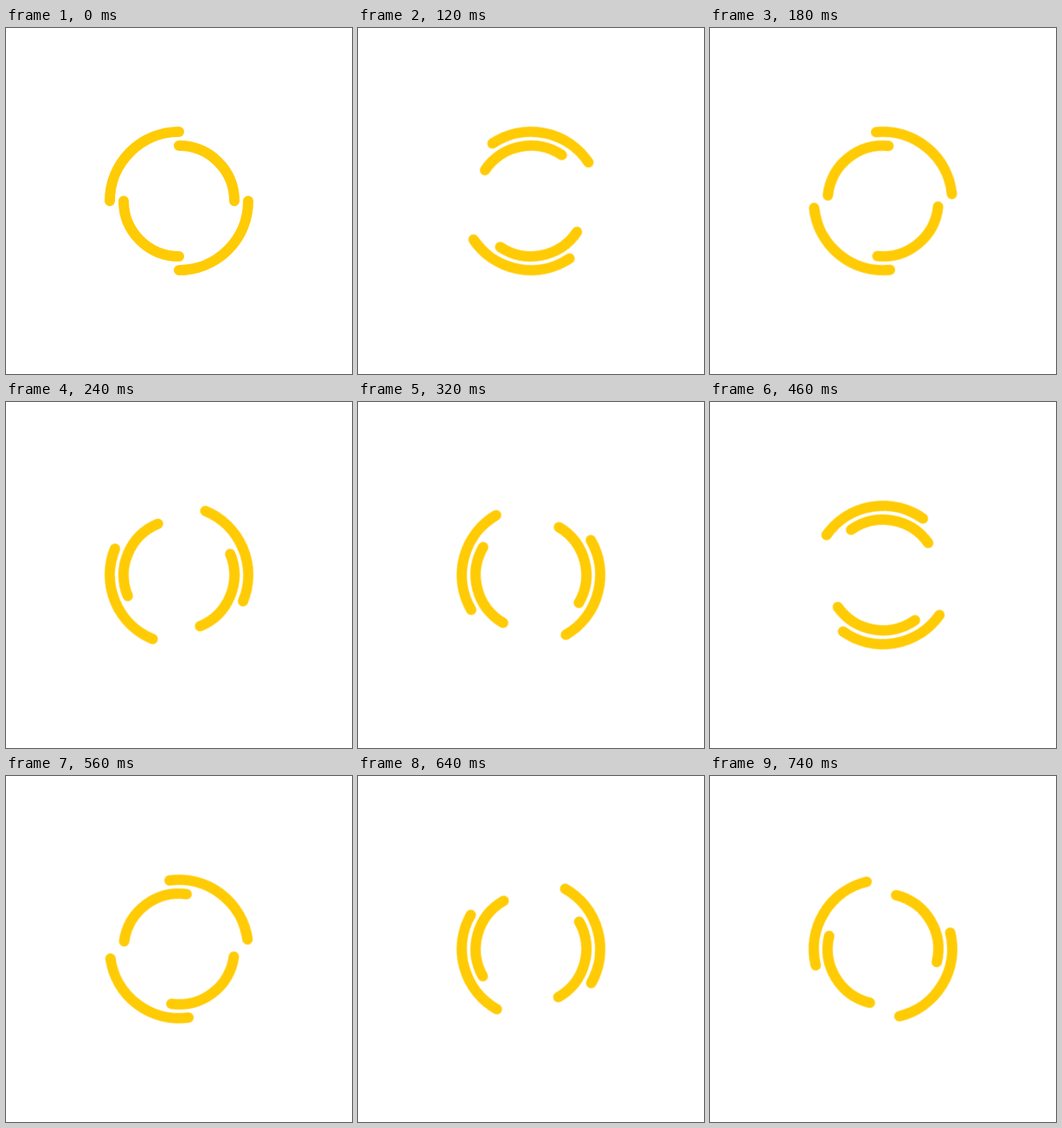
These frames come from a looping animation (400 px wide and 400 px high, 760 ms). An HTML page:

```html
<!DOCTYPE html>
<html lang="en">
<head>
<meta charset="utf-8">
<title>Double ring spinner</title>
<style>
  html, body {
    margin: 0;
    width: 100%;
    height: 100%;
    overflow: hidden;
    background: #fff;
  }
  svg {
    display: block;
    width: 100vw;
    height: 100vh;
  }
  path {
    fill: none;
    stroke: #ffcb05;
    stroke-width: 12;
    stroke-linecap: round;
  }
  /* 38 steps of 9.36deg; the last step falls just short of a full turn */
  .ring {
    --turn: 355.68deg;
    transform-origin: 0 0;
    animation: spin 760ms steps(38) -1ms infinite;
  }
  .inner { --turn: -355.68deg; }
  @keyframes spin {
    from { transform: rotate(0deg); }
    to { transform: rotate(var(--turn)); }
  }
</style>
</head>
<body>
<svg viewBox="-200 -200 400 400">
  <path class="ring outer" d="M-80 0A80 80 0 0 1 0 -80M80 0A80 80 0 0 1 0 80"/>
  <path class="ring inner" d="M0 -64A64 64 0 0 1 64 0M0 64A64 64 0 0 1 -64 0"/>
</svg>
</body>
</html>
```
